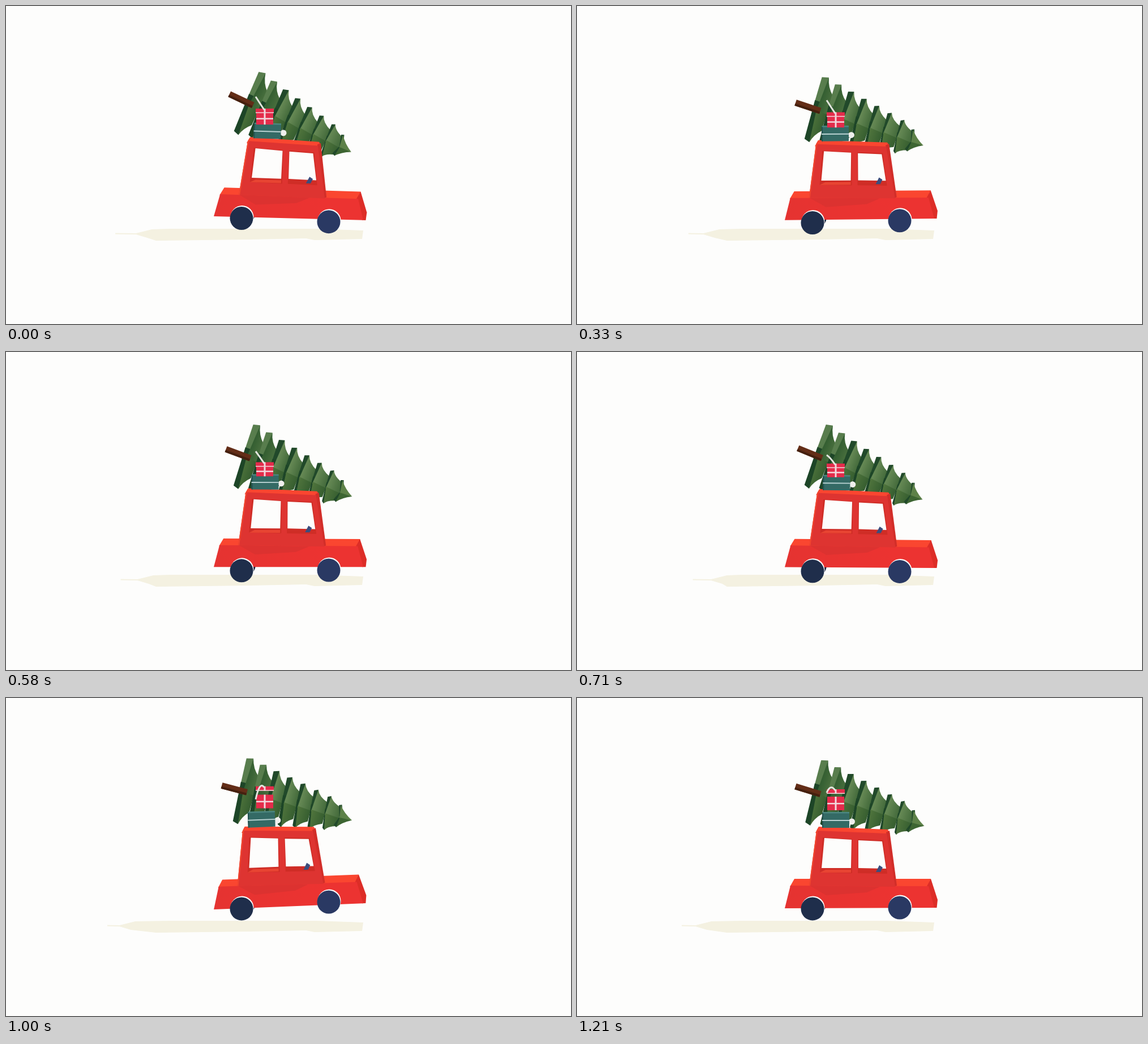
Recreate the animation shown at these times as an HTML page with a canvas. Size 998 px wide and 561 px high, loop 1250 ms.

```html
<!DOCTYPE html>
<html lang="en">
<head>
<meta charset="utf-8">
<title>Bringing the tree home</title>
<style>
html, body { margin: 0; width: 100%; height: 100%; overflow: hidden; background: #fdfdfc; }
canvas { display: block; }
</style>
</head>
<body>
<canvas id="stage" width="998" height="561"></canvas>
<script>
const ctx = document.getElementById('stage').getContext('2d');
const LOOP = 1250, PAPER = '#fdfdfc';
const CENTER = 502, BASE = 370.5, PIVOT = 110;

// The ride is set by four [time, value] curves; everything else follows from them.
const dropCurve = [[0, 4], [460, 6.8], [710, 9.8], [830, 3.3], [1000, -3], [1210, 0]];
const tiltCurve = [[0, .03], [210, -.002], [460, -.0055], [710, .0093], [1000, -.037], [1210, 0]];
const leanCurve = [[0, 25.3], [210, 19.1], [460, 18.9], [710, 22.2], [830, 21.5], [1000, 14.8], [1210, 16.9]];
const ribbonCurve = [[0, -21], [710, -15], [1000, 23], [1210, 6]];

function sample(curve, t) {
  const last = curve.length - 1;
  if (t >= curve[last][0]) return curve[last][1];
  const i = curve.findIndex((p, n) => curve[n + 1][0] > t);
  const slope = n => {
    const [ta, va] = curve[Math.max(n - 1, 0)], [tb, vb] = curve[Math.min(n + 1, last)];
    return (vb - va) / (tb - ta);
  };
  const [t0, v0] = curve[i], [t1, v1] = curve[i + 1];
  const s = (t - t0) / (t1 - t0), d = v1 - v0;
  const m0 = slope(i) * (t1 - t0), m1 = slope(i + 1) * (t1 - t0);
  return v0 + s * (m0 + s * (3 * d - 2 * m0 - m1 + s * (m0 + m1 - 2 * d)));
}

function shape(fill, path) {
  ctx.fillStyle = fill;
  ctx.fill(new Path2D(path));
}

function rect(fill, x, y, w, h) {
  ctx.fillStyle = fill;
  ctx.fillRect(x, y, w, h);
}

function disc(fill, x, y, r) {
  ctx.fillStyle = fill;
  ctx.beginPath();
  ctx.arc(x, y, r, 0, 7);
  ctx.fill();
}

function ramp(x0, x1, from, to) {
  const g = ctx.createLinearGradient(x0, 0, x1, 0);
  g.addColorStop(0, from);
  g.addColorStop(1, to);
  return g;
}

function within(transform, draw) {
  ctx.save();
  transform();
  draw();
  ctx.restore();
}

function drawShadow(tip, lean) {
  const x = tip + 1.45 * lean;
  shape('#f4f1e1',
    `M${tip} 400.5L${x} 401L${x + 28} 394L290 393H548L631 396L629 411L545 413L530 410L430 412L265 414L${x + 20} 409L${x} 403L${tip} 402.5Z`);
}

function drawTier(i) {
  const back = 30 + 26 * i, half = 58 - 4.8 * i, rim = back + 12 - i;
  const end = back + 29, neck = half * .56, broad = i < 2;
  shape(broad ? '#587d4d' : '#21492a', `M${back} ${-half}L${rim} ${-half - 3}L${rim + 4} 0H${back + 2}Z`);
  shape('#1d4527', `M${back + 2} 0L${back + 1} ${-half * .27}H${rim + 4}L${rim + 3} ${half}L${back + 5} ${half - 3}Z`);
  shape(broad ? ramp(rim, end, '#355f32', '#496f3e') : ramp(rim, end, '#648753', '#42693a'),
    `M${rim} ${-half - 3}Q${rim + 4} ${-half * .75} ${end} ${-neck}V3H${rim - 3}Z`);
  shape(ramp(back, end, '#55793f', '#365e30'),
    `M${rim - 3} 0L${end} 2V${neck}Q${rim + 6} ${half * .75} ${rim + 3} ${half}Z`);
}

function drawTree() {
  for (let i = 0; i < 7; i++) {
    drawTier(i);
    if (i === 0) {
      rect('#632d17', 0, -6, 46, 11);
      rect('#45200f', 0, 1, 46, 4);
    }
  }
  shape('#21492a', 'M209 -20L214 -22L222 0L214 19L209 16L215 0Z');
  shape('#5d8148', 'M212 -21Q222 -8 238 0L216 3Z');
  shape('#3d6532', 'M216 1L238 0Q222 8 214 19Z');
}

function drawCar() {
  shape('#fa4630', 'M384 319H625V333H376Z');
  shape('#dd2d27', 'M625 319L637 356L635.5 370H629L618 332Z');
  shape(ramp(367, 560, '#e53331', '#ec3331'), 'M377 331L621 332L631 370L367 371Z');
  shape('#dc3230', 'M411 331L535 333L512 343L440 348Z');
  shape('#fa4630', 'M427 227L549 232L553 240L421 238Z');
  shape('#d22e29', 'M546 237L552 234L565 331L559 333Z');
  shape('#de3431', 'M423 234L547 239L562 333L410 331Z');
  shape('#f1452f', 'M427 227L423 234L410 331L412 331L425 236Z');
  shape('#cf2d26', 'M434 246L486 249V309L429 308ZM496 249L541 251L548 310L496 309Z');
  shape('#e84432', 'M439 303H484V308H429Z');
  shape(PAPER, 'M437 247L485 250L484 300L432 300ZM497 251L539 253L546 301L497 300Z');
  shape('#3b4d7d', 'M528 307L534 295L540 299L536 307Z');
}

function drawCase() {
  disc('#efefec', 485.5, 218, 5.5);
  rect('#346a65', 433, 202, 48, 27);
  rect('#4b8780', 434, 201, 47, 2.5);
  rect('#235150', 433, 203, 2, 26);
  rect('#b9d2d2', 433, 215, 48, 2);
}

function drawGift(bottom, lid, ribbon) {
  const height = Math.min(24, bottom - lid - 7), top = bottom - height;
  const red = '#e42c4b', band = '#f1d7dc';
  rect(red, 442, top, 30, height);
  rect(band, 442, top + height / 2 - 1, 30, 2.5);
  rect(band, 455.5, top, 3, height);
  rect(red, 441, lid, 32, 8);
  rect(band, 441, lid + 6.5, 32, 1.5);
  rect(band, 455.5, lid, 3, 8);
  ctx.strokeStyle = '#e4e6df';
  ctx.lineWidth = 3;
  ctx.stroke(new Path2D(`M441 ${lid + ribbon}Q448 ${lid - 10} 456 ${lid + 2}`));
}

function drawWheel(x, y, fill) {
  disc(PAPER, x + 1, y - 2, 20.5);
  disc(fill, x, y, 20.5);
}

function draw(t) {
  const drop = sample(dropCurve, t), tilt = sample(tiltCurve, t), lean = sample(leanCurve, t);
  const squash = 1 - .004 * Math.max(drop, 0);
  const air = Math.min(Math.max(1 - drop / 3.3, 0), 1.3);
  const ground = BASE + drop;
  const roof = ground - 141 * squash;
  const caseTop = ground - 168.5 * squash - 45 * tilt;
  const gift = caseTop + 1 + .2 * drop - 5 * air;
  const lid = gift - 31 - 6 * air + .7 * Math.max(drop, 0);
  const rear = ground - 135 * tilt + 1.4 + .65 * drop;
  const front = ground + 135 * tilt - .5 + .65 * drop;

  rect(PAPER, 0, 0, 998, 561);
  drawShadow(185 + 2 * drop, lean);
  within(() => {
    ctx.translate(491 + 100 * tilt, roof - 33 - 8 * air);
    ctx.rotate(lean * Math.PI / 180);
    ctx.translate(-PIVOT, 0);
  }, drawTree);
  disc('#18233f', 423, rear - 10, 18);
  within(() => {
    ctx.translate(CENTER, ground);
    ctx.rotate(tilt);
    ctx.scale(1, squash);
    ctx.translate(-CENTER, -BASE);
  }, () => {
    drawCar();
    drawCase();
  });
  drawGift(gift, lid, sample(ribbonCurve, t));
  drawWheel(416, rear, '#1f2e4b');
  drawWheel(570, front, '#2a3963');
}

function tick(now) {
  draw(now % LOOP);
  requestAnimationFrame(tick);
}
requestAnimationFrame(tick);
</script>
</body>
</html>
```
